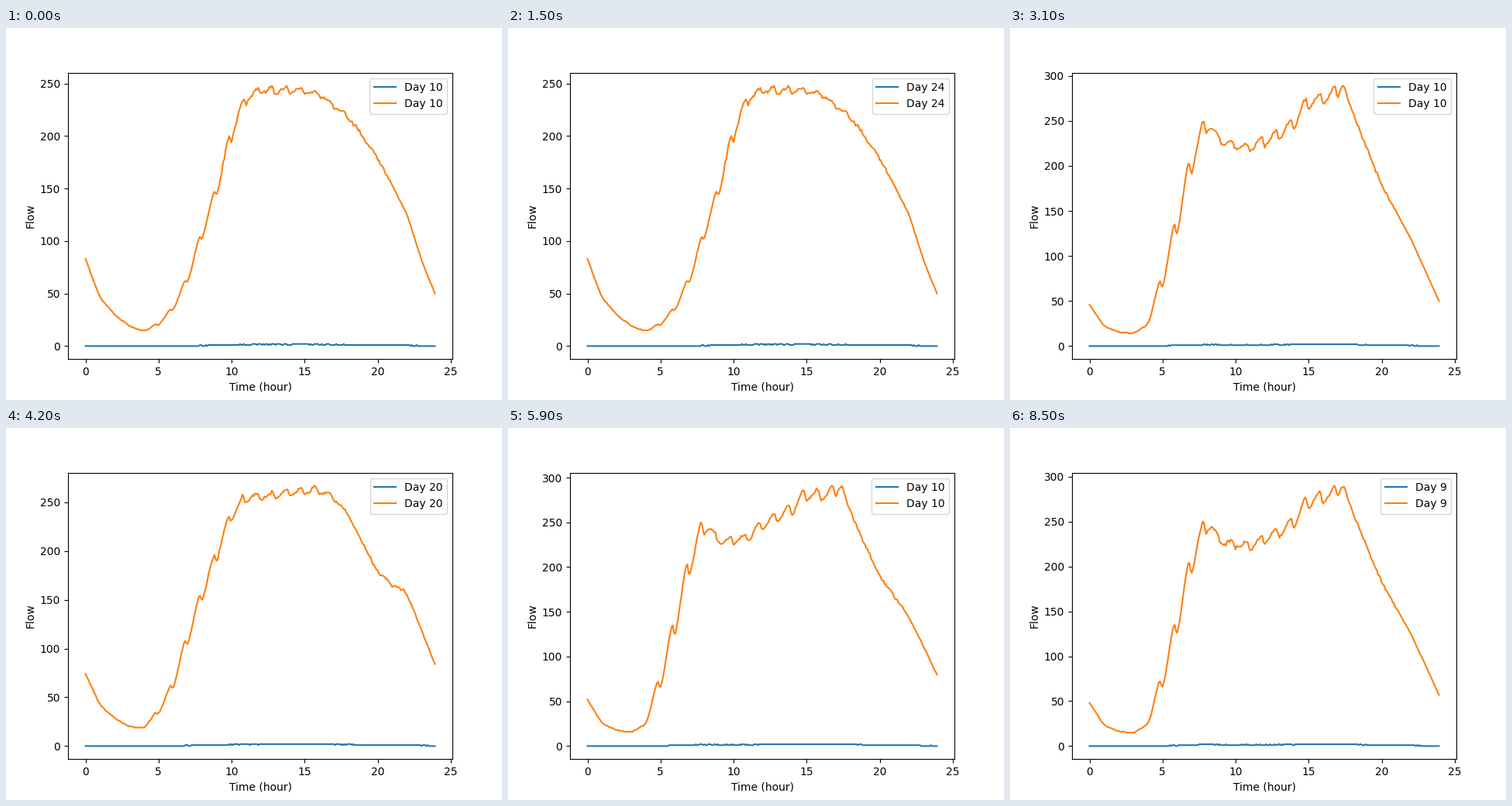
These frames come from a looping animation (640 px wide and 480 px high, 8600 ms). A matplotlib script:

```python
import numpy as np
import matplotlib.pyplot as plt
from matplotlib.animation import FuncAnimation

TIME = np.arange(288) / 12

# Key points (hour, flow) of the calm trend; hourly ripples ride on top.
WORKDAY = [(0, 46), (1, 22), (2, 15.5), (3, 14), (4, 24), (5, 65), (6, 125),
           (7, 193), (8, 240), (8.7, 236), (9, 223), (11, 216), (13, 230),
           (14, 241), (15, 264), (17, 275), (17.3, 289), (17.7, 274),
           (18, 260), (20, 179), (22, 119), (24, 47)]
SATURDAY = [(0, 74), (1, 42), (2, 28.5), (3, 20), (4, 18.5), (5, 33), (6, 59),
            (8, 151), (10, 232), (11, 251), (16, 260), (17, 253), (18, 236),
            (20, 179), (21, 164), (22, 157), (24, 81)]
SUNDAY = [(0, 83), (1, 46), (2, 30), (3, 19), (4, 14), (5, 20), (6, 34),
          (7, 61), (9, 145), (10, 197), (11, 233), (12, 241), (14, 242),
          (16, 238), (18, 217), (20, 180), (22, 126), (23, 82), (24, 47)]


def smooth(y, width=5):
    padded = np.pad(y, width // 2, mode="reflect", reflect_type="odd")
    return np.convolve(padded, np.ones(width) / width, mode="valid")


def ripple(trend):
    """Hump peaking before each full hour, stronger on rising flow."""
    part = TIME % 1
    rise = np.minimum(part / 0.78, (1 - part) / 0.22)
    slope = smooth(np.gradient(trend, TIME), 9)
    size = np.maximum(0, 0.04 * trend + 0.3 * slope) * (TIME > 4)
    return size * np.sin(rise * np.pi / 2) ** 2


def day_curves(keys, peak, swing=1, night=0, noon=0, evening=0):
    """Return the low (0 to 2) and high series of one weekday."""
    rng = np.random.default_rng(peak)
    trend = smooth(np.interp(TIME, *zip(*keys)))
    flow = trend + swing * ripple(trend)
    flow += night * np.exp(-TIME / 2)
    flow += noon * np.exp(-((TIME - 12.8) / 2.8) ** 2)
    flow += evening / (1 + np.exp(20.5 - TIME))
    flow += rng.normal(0, 0.8, TIME.size) * (flow > 150)
    flow *= peak / flow.max()
    rough = flow + rng.normal(0, 11, TIME.size)
    low = (rough > 112).astype(int) + (rough > 236)
    return low, np.round(flow)


WEEK = [
    day_curves(WORKDAY, 279, night=5),
    day_curves(WORKDAY, 283),
    day_curves(WORKDAY, 289),
    day_curves(WORKDAY, 290, night=2, noon=2, evening=7),
    day_curves(WORKDAY, 291, night=6, noon=21, evening=31),
    day_curves(SATURDAY, 267, swing=0.7),
    day_curves(SUNDAY, 248, swing=0.6),
]

# (first day, last day, weekday of the 1st); days run in text order.
MONTHS = [(1, 31, 4), (1, 28, 0), (2, 28, 2)]
DAYS = [(day, (start + day - 1) % 7)
        for first, last, start in MONTHS
        for day in sorted(range(first, last + 1), key=lambda d: f"{d}_")]

fig, ax = plt.subplots(figsize=(6.4, 4.8), dpi=100)


def draw(i):
    day, weekday = DAYS[i]
    ax.clear()
    for series, color in zip(WEEK[weekday], ("#1f77b4", "#ff7f0e")):
        ax.plot(TIME, series, color=color, lw=1.5, label=f"Day {day}")
    ax.set_xlabel("Time (hour)")
    ax.set_ylabel("Flow")
    ax.legend(loc="upper right")
    return ax.lines


anim = FuncAnimation(fig, draw, frames=len(DAYS), init_func=lambda: draw(0),
                     interval=100, repeat=True, repeat_delay=0)
plt.show()
```
